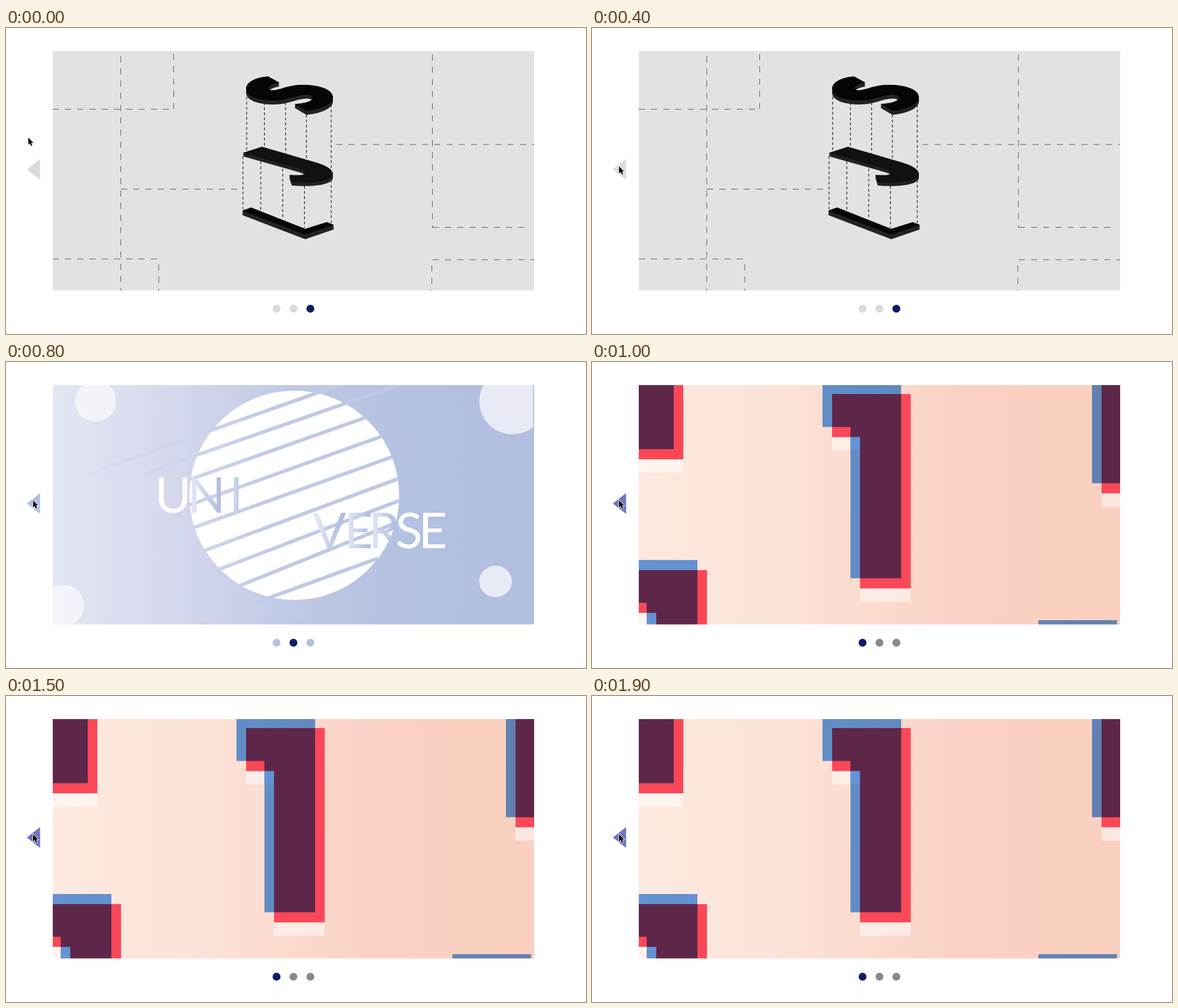
Write an HTML page that moves like this. It is 1029 px wide and 544 px high and loops after 2 s.

```html
<!DOCTYPE html>
<html lang="en">
<head>
<meta charset="utf-8">
<title>Slider</title>
<style>
  html, body { margin: 0; width: 100%; height: 100%; overflow: hidden; background: #fff; }
  svg { display: block; }
  .slide { clip-path: url(#stage); }
  .dash { fill: none; stroke: #55565c; stroke-dasharray: 11 10.7; }
  .drop { fill: none; stroke: #151515; stroke-width: 1.2; stroke-dasharray: 5 4; }
  .title { font: 88px Lato, sans-serif; }
</style>
</head>
<body>
<svg width="1029" height="544" viewBox="0 0 1029 544">
  <defs>
    <clipPath id="stage"><path d="M83 41H937V466.500H83z"/></clipPath>
    <linearGradient id="sky">
      <stop stop-color="#e3e6f3"/><stop offset=".2" stop-color="#d9dbee"/>
      <stop offset=".35" stop-color="#cdd2eb"/><stop offset=".5" stop-color="#c0c9e5"/>
      <stop offset=".65" stop-color="#b8c3e2"/><stop offset=".85" stop-color="#b2bfe0"/>
    </linearGradient>
    <linearGradient id="peach">
      <stop stop-color="#fde9df"/><stop offset=".25" stop-color="#fce4da"/>
      <stop offset=".5" stop-color="#fbdacd"/><stop offset=".65" stop-color="#fad2c5"/>
      <stop offset=".85" stop-color="#fad0c1"/>
    </linearGradient>
    <linearGradient id="beam" gradientUnits="userSpaceOnUse" x1="130" y1="0" x2="690" y2="0">
      <stop stop-color="#d3d7ed" stop-opacity="0"/><stop offset=".2" stop-color="#d3d7ed"/>
      <stop offset=".45" stop-color="#ccd2eb"/><stop offset=".6" stop-color="#c1cae6"/>
      <stop offset="1" stop-color="#bec7e5"/>
    </linearGradient>
    <linearGradient id="blue" gradientUnits="userSpaceOnUse" x1="83" y1="0" x2="937" y2="0">
      <stop stop-color="#6493d2"/><stop offset=".45" stop-color="#628cc5"/><stop offset="1" stop-color="#6280b0"/>
    </linearGradient>
    <linearGradient id="letter">
      <stop offset=".1" stop-color="#e4e6f4"/><stop offset=".85" stop-color="#b1bee0"/>
    </linearGradient>
  </defs>

  <g class="slide">
    <path fill="#e2e2e2" d="M83 41H937V467H83z"/>
    <path class="dash" d="M203.500 50V467M83 144.500H298M297.500 144V41M83 410.500H271M271 420V467M586 207H937M756.500 47V355M757 354.500H930M757 412H937M755.500 422V467"/>
    <path class="dash" style="stroke:#4c4c7c" d="M204 286.500H410"/>
    <path class="drop" d="M427 122V219M458.500 132V212M496 132V223M533 154V235M577 136V250M420.500 228V322M452 237V323M491 250V340M529.500 281V355M577 270V347"/>
    <g id="letters"></g>
  </g>

  <g class="slide">
    <path fill="url(#sky)" d="M83 41H937V467H83z"/>
    <circle cx="511.500" cy="237" r="186" fill="#fff"/>
    <path fill="none" stroke="url(#beam)" stroke-width="6.500" d="M135 203L365 121 600 38M245 200L340 165 690 43M326 209L640 98M326 254L667 132M331 295L687 168M350 336L697 207M374 370L699 246M411 399L692 286M345 467L470 418 660 349"/>
    <g fill="#fff" fill-opacity=".62">
      <circle cx="159" cy="69.500" r="36.500"/>
      <circle cx="102.500" cy="433" r="36.500"/>
    </g>
    <g fill="#e8ebf5">
      <path d="M935 41V116A59 59 0 0 1 847 41z"/>
      <ellipse cx="868.500" cy="390" rx="29" ry="28"/>
    </g>
    <g class="title" id="title"></g>
  </g>

  <g class="slide">
    <path fill="url(#peach)" d="M83 41H937V467H83z"/>
    <path fill="#fff" fill-opacity=".5" d="M83 173H162V196.500H83zM426 133H475V157H426zM475.500 402H565V426.500H475.500zM904 233H937V257H904zM83 446H97V467H83z"/>
    <path fill="#fb4858" d="M145 41H162V173H83V155H145zM548 57H565.500V402.500H475.500V384H548zM426 115H459V133.500H426zM904 215H937V233.500H904zM187 370H204V467H187zM83 428H97V446H83z"/>
    <path fill="url(#blue)" d="M409 41H548.500V57.500H426V115.500H409zM458.500 133.500H476V384.500H458.500zM887 41H904V215.500H887zM83 352H187V370H83zM97 446H114V467H97zM792 459H931.500V467H792z"/>
    <path fill="#6494d8" d="M458.500 133.500H475.500V157H458.500z"/>
    <path fill="#5e274a" d="M83 41H145V155H83zM426 57H548.500V384.500H475.500V133.500H458.500V115.500H426zM904 41H937V215.500H904zM83 370H187V467H114V446H97V428H83z"/>
  </g>

  <path id="arrow" d="M37 251.500L60.500 233V270z"/>
  <g id="dots">
    <circle cx="480" cy="499" r="7"/><circle cx="510" cy="499" r="7"/><circle cx="540" cy="499" r="7"/>
  </g>
  <path id="cursor" d="M0 0V12.500L2.900 9.900 5 14.500 7.200 13.500 5.200 9H9z" stroke="#fff" stroke-width="1.600" paint-order="stroke"/>
</svg>
<script>
const $ = id => document.getElementById(id);
const LOOP = 2000, STEP = 100;

// Solid letters: the outline repeated downwards, then the top face.
const solids = [
  ['#060606', 7, 'M465 86L485 97C472 99 464 104 466 108C470 114 487 108 497 105C508 102 517 101 527 101C556 101 580 109 580 123C580 135 563 144 533 147.500L512 135C535 134 547 128 544 122C540 117 528 118 517 121C503 125 492 129 475 129C446 129 426 121 426 108C426 97 440 88 465 86z'],
  ['#111', 6, 'M420 222L454 211 550 239C570 245 580 252 580 260C580 270 557 275 530 275Q518 275 507 274L503 261Q517 262 526 261C535 258 531 254 522 251z'],
  ['#060606', 8, 'M419 324.500L435 319 531 357 569 345 582 350 531 367.500z']
];
$('letters').innerHTML = solids.map(([face, depth, d]) => {
  let layers = '';
  for (let y = depth; y >= 0; y--)
    layers += `<path d="${d}" fill="${y ? '#232323' : face}" transform="translate(0 ${y})"/>`;
  return layers;
}).join('');

const glyphs = (word, y, xs, tinted) => [...word].map((c, i) =>
  `<text x="${xs[i]}" y="${y}" fill="${tinted.includes(i) ? 'url(#letter)' : '#fff'}">${c}</text>`).join('');
$('title').innerHTML =
  glyphs('UNI', 268, [264, 322, 396], [1, 2]) +
  glyphs('VERSE', 331, [544, 600, 643, 691, 732], [0, 1, 2]);

const slides = document.querySelectorAll('.slide');
const themes = [
  { arrow: '#dbdadc', dot: '#d9d9d9', active: 2 },
  { arrow: '#b3bfe0', dot: '#b3c0df', active: 1 },
  { arrow: '#7574c0', dot: '#898989', active: 0 }
];

function draw(now) {
  const t = Math.floor(now % LOOP / STEP) * STEP;
  const current = t < 500 ? 0 : t < 1000 ? 1 : 2;
  const { arrow, dot, active } = themes[current];
  slides.forEach((s, i) => s.style.display = i === current ? '' : 'none');
  $('arrow').setAttribute('fill', arrow);
  [...$('dots').children].forEach((c, i) => c.setAttribute('fill', i === active ? '#0d1c66' : dot));

  const p = Math.min(t / 400, 1), ease = p * p * (3 - 2 * p);
  $('cursor').setAttribute('transform', `translate(${39.500 + 8.500 * ease} ${195 + 51 * ease})`);
  requestAnimationFrame(draw);
}
draw(0);
</script>
</body>
</html>
```
